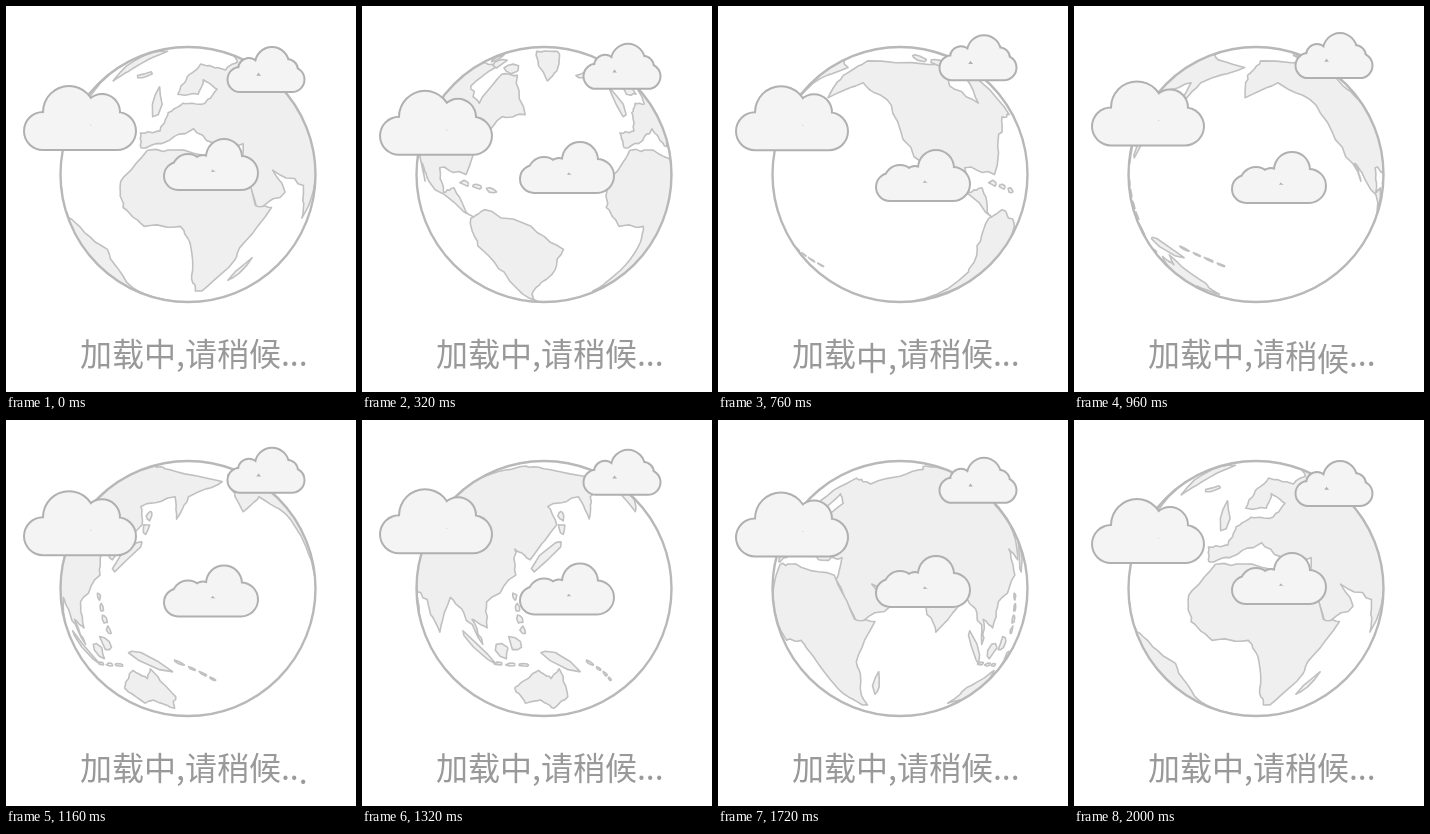
These frames come from a looping animation (350 by 386 pixels, 2040 ms). An HTML page with a canvas:

```html
<!DOCTYPE html>
<html lang="zh-CN">
<head>
<meta charset="utf-8">
<style>
html, body { margin: 0; width: 100%; height: 100%; overflow: hidden; background: #fff; }
canvas { display: block; }
</style>
</head>
<body>
<canvas id="stage" width="350" height="386"></canvas>
<script>
const ctx = document.getElementById('stage').getContext('2d');
const LOOP = 2040, STEP = 40, SPIN = 2000;
const CX = 182, CY = 168.5, R = 127.5;
const TAU = 2 * Math.PI, RAD = Math.PI / 180;

let seed = 7;
function jitter(size) {
  seed = seed * 16807 % 2147483647;
  return (seed / 2147483647 - 0.5) * size;
}

// Key points as longitude, map height; coast() roughens the edges between them
const eurasia = [
  -9,40, -10,47, -1,48, 2,57, 9,62, 20,62, 28,70, 21,76, 17,67, 6,67, 11,78, 22,88, 40,83, 68,92, 105,102,
  140,97, 190,85, 163,74, 157,61, 155,74, 136,68, 140,58, 128,41, 121,46, 122,34, 109,22, 108,10, 101,14,
  104,2, 97,17, 90,24, 78,8, 72,23, 50,30, 58,20, 43,12, 34,32, 36,42, 24,41, 14,49, 0,42];
const africa = [
  -6,39, -18,25, -18,13, -9,4, 8,4, 13,-7, 14,-24, 19,-38, 26,-38, 39,-14, 39,-7, 51,13, 42,14, 33,34, 10,39];
const northAmerica = [
  -167,79, -157,91, -87,88, -95,72, -81,62, -76,80, -64,79, -55,56, -66,55, -76,44, -81,28, -97,31, -95,20,
  -88,22, -83,11, -78,8, -106,25, -114,33, -110,25, -124,44, -132,64, -148,74, -167,65];
const southAmerica = [-81,8, -73,12, -52,4, -36,-8, -41,-24, -57,-38, -71,-55, -73,-22, -82,-6];
const australia = [114,-23, 116,-36, 131,-33, 146,-42, 153,-30, 142,-11, 138,-17, 131,-12];
const greenland = [-44,75, -58,103, -24,103, -36,84];

function coast(keys) {
  const pts = [], n = keys.length, parts = 5;
  for (let i = 0; i < n; i += 2) {
    const dx = keys[(i + 2) % n] - keys[i], dy = keys[(i + 3) % n] - keys[i + 1];
    const rough = Math.min(2, Math.hypot(dx, dy) / 8);
    for (let k = 0; k < parts; k++) {
      const r = k ? rough : 0;
      pts.push([keys[i] + dx * k / parts + jitter(r), keys[i + 1] + dy * k / parts + jitter(r)]);
    }
  }
  return pts;
}

// A row of rough islands between two places
function islands(lon1, h1, lon2, h2, count, width) {
  const dx = (lon2 - lon1) / count, dy = (h2 - h1) / count, len = Math.hypot(dx, dy);
  return Array.from({ length: count }, (_, i) =>
    Array.from({ length: 7 }, (_, k) => {
      const a = TAU * k / 7, size = 0.5 + jitter(0.35);
      const u = Math.cos(a) * size * (count > 1 ? 0.7 : 1), v = Math.sin(a) * size * width / len;
      return [lon1 + dx * (i + 0.5 + u) - dy * v, h1 + dy * (i + 0.5 + u) + dx * v];
    }));
}

const lands = [
  ...[eurasia, africa, northAmerica, southAmerica, australia, greenland].map(coast),
  ...islands(44, -28, 50, -13, 1, 4),     // Madagascar
  ...islands(-4, 56, -5, 70, 1, 5),       // Britain
  ...islands(-24, 78, -14, 80, 1, 4),     // Iceland
  ...islands(129, 36, 143, 51, 1, 4),     // Japan
  ...islands(142, 52, 143, 67, 2, 3),     // Sakhalin
  ...islands(95, 7, 107, -7, 1, 3),       // Sumatra
  ...islands(106, -8, 127, -9, 3, 1.5),   // Java
  ...islands(110, -3, 124, 4, 2, 7),      // Borneo
  ...islands(121, 27, 125, 6, 4, 2),      // Philippines
  ...islands(130, 0, 151, -11, 1, 5),     // New Guinea
  ...islands(155, -6, 181, -19, 4, 1),    // Pacific
  ...islands(-85, 25, -66, 20, 3, 2),     // Caribbean
  ...islands(-115, 97, -64, 82, 3, 7)     // Arctic
];

// Each cloud is a union of circles: x, height above the flat base, radius
const clouds = [
  { y: a => 141 + 8 * Math.sin(a + 22 * RAD),
    puffs: [[37, 19, 19], [63, 38, 26], [96, 38, 18], [111, 19, 19]] },
  { y: a => 190.5 - 6.5 * Math.cos(a),
    puffs: [[172, 14, 14], [182, 20, 16], [197, 24, 11], [218, 33, 18], [235, 17, 17]] },
  { y: a => 79 + 7 * Math.cos(a),
    puffs: [[234, 12.5, 12.5], [243, 23, 11], [266, 28, 17], [281, 22, 11], [286, 12.5, 12.5]] }
];

function drawLand(pts, lon0) {
  const fill = new Path2D(), shore = new Path2D();
  let wasHidden = true, seen = false;
  for (const [lon, height] of [...pts, pts[0]]) {
    // Slight widening imitates a near camera
    const raw = (lon - lon0) * 1.08, angle = Math.max(-90, Math.min(90, raw));
    const tilt = (height - 28) * RAD, hidden = raw !== angle;
    const x = CX + R * Math.cos(tilt) * Math.sin(angle * RAD), y = CY - R * Math.sin(tilt);
    fill.lineTo(x, y);
    if (hidden && wasHidden) shore.moveTo(x, y);
    else shore.lineTo(x, y);
    wasHidden = hidden;
    seen = seen || !hidden;
  }
  if (!seen) return;
  ctx.fill(fill);
  ctx.stroke(shore);
}

function drawGlobe(t) {
  const lon0 = 11.5 - 360 * t / SPIN;
  const rim = new Path2D();
  rim.arc(CX, CY, R, 0, TAU);
  ctx.save();
  ctx.clip(rim);
  ctx.fillStyle = '#efefef';
  ctx.strokeStyle = '#c0c0c0';
  ctx.lineWidth = 1.6;
  for (const land of lands)
    for (const turn of [-360, 0, 360]) drawLand(land, lon0 + turn);
  ctx.restore();
  ctx.strokeStyle = '#b8b8b8';
  ctx.lineWidth = 2.4;
  ctx.stroke(rim);
}

function fillCloud(puffs, base, grow, color) {
  const left = puffs[0], right = puffs[puffs.length - 1], tall = left[2] * 1.3;
  ctx.fillStyle = color;
  ctx.beginPath();
  for (const [x, h, r] of puffs) {
    ctx.moveTo(x, base - h);
    ctx.arc(x, base - h, r + grow, 0, TAU);
  }
  ctx.rect(left[0], base - tall, right[0] - left[0], tall + grow);
  ctx.fill();
}

function drawClouds(t) {
  for (const { y, puffs } of clouds) {
    const base = y(TAU * t / LOOP);
    fillCloud(puffs, base, 1, '#b0b0b0');
    fillCloud(puffs, base, -1, '#f4f4f4');
  }
}

function drawText(t) {
  ctx.font = '32px "Noto Sans CJK SC", "Noto Sans CJK", "Noto Sans SC", sans-serif';
  ctx.fillStyle = '#999';
  let x = 74;
  [...'加载中,请稍候...'].forEach((ch, i) => {
    const p = (t - 620 - 58 * i) / 85;
    const dip = Math.abs(p) < 1 ? 5 * Math.cos(p * Math.PI / 2) ** 2 : 0;
    ctx.fillText(ch, x, 360 + dip);
    x += ctx.measureText(ch).width;
  });
}

function draw() {
  const t = Math.floor(performance.now() % LOOP / STEP) * STEP;
  ctx.fillStyle = '#fff';
  ctx.fillRect(0, 0, 350, 386);
  ctx.lineJoin = 'round';
  drawGlobe(t);
  drawClouds(t);
  drawText(t);
  requestAnimationFrame(draw);
}
draw();
</script>
</body>
</html>
```
